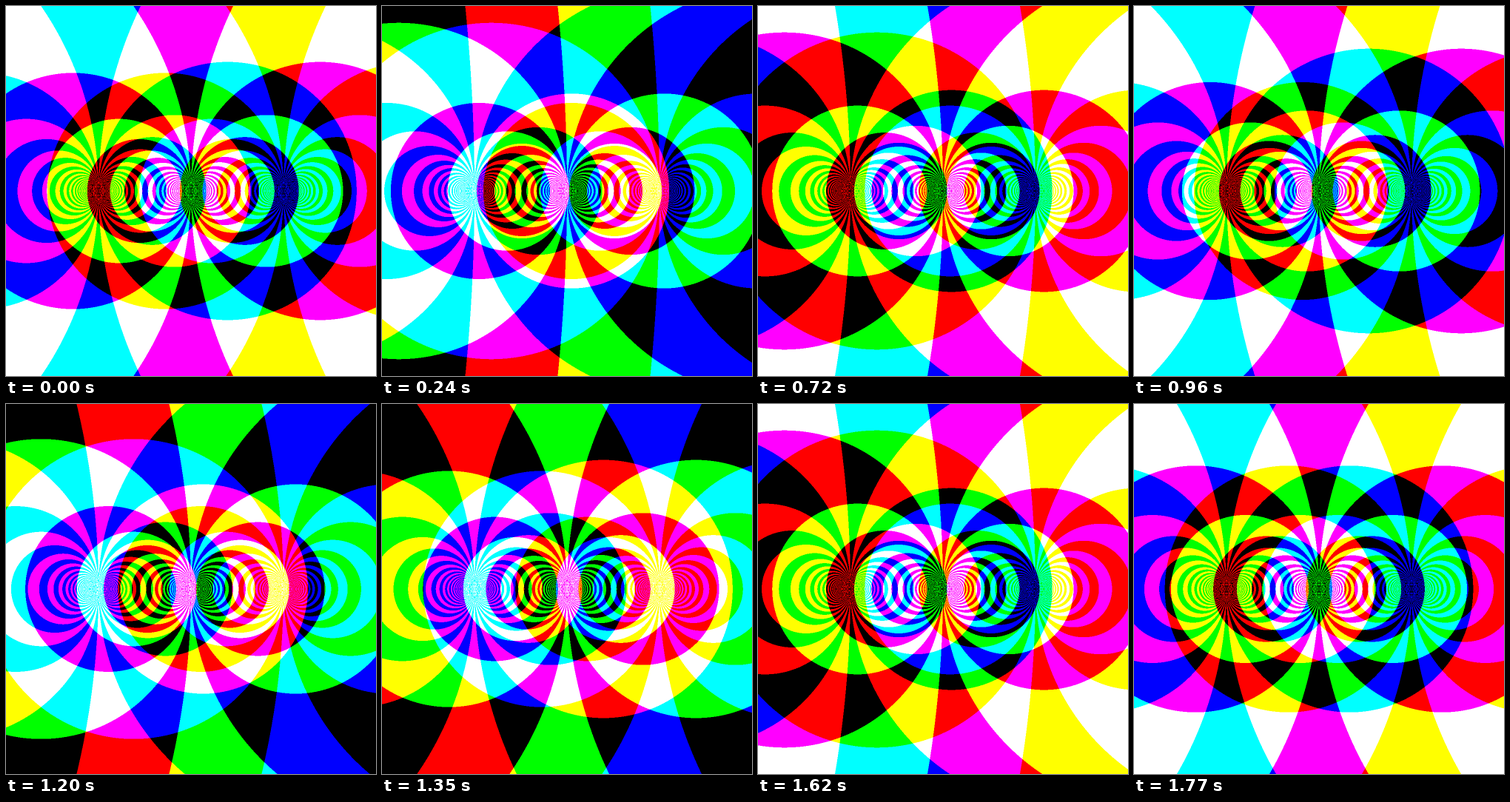
An HTML page with a canvas that plays this animation: 500x500 px, repeating every 1800 ms.

```html
<!DOCTYPE html>
<html lang="en">
<head>
<meta charset="utf-8">
<title>Inverted stripes</title>
<style>
  html, body { margin: 0; width: 100%; height: 100%; overflow: hidden; background: #fff; }
  canvas { display: block; width: 500px; height: 500px; image-rendering: pixelated; }
</style>
</head>
<body>
<canvas id="stage" width="500" height="500"></canvas>
<script>
const SIZE = 500, STEP = 30, STEPS = 60;
const SHIFT = SIZE / 4;              // distance between the red, green and blue centres
const WIDE = SIZE + 2 * SHIFT;       // one field serves all three channels
const SUB = 2, SAMPLES = SUB * SUB;  // samples per pixel, for soft edges
const ctx = document.getElementById('stage').getContext('2d');
const image = ctx.createImageData(SIZE, SIZE);
const data = image.data.fill(255);

// Real part of 1/z in stage units: vertical stripes turned into tangent circles.
function inverted(x, y) {
  const dx = x - WIDE / 2, dy = y - SIZE / 2;
  return SIZE * dx / (dx * dx + dy * dy);
}

const field = new Float64Array(WIDE * SIZE * SAMPLES);
for (let y = 0, i = 0; y < SIZE; y++) {
  for (let x = 0; x < WIDE; x++) {
    for (let s = 0; s < SAMPLES; s++) {
      const sx = (s % SUB + 0.5) / SUB;
      const sy = (Math.floor(s / SUB) + 0.5) / SUB;
      field[i++] = inverted(x + sx, y + sy);
    }
  }
}

const stripes = new Uint8ClampedArray(WIDE * SIZE);

function draw(step) {
  // Four stripes pass per loop; 0.5 centres a dark stripe on the axis.
  const phase = 4 * (step + 1) / STEPS + 0.5;
  for (let q = 0, i = 0; q < stripes.length; q++) {
    let lit = 0;
    for (let s = 0; s < SAMPLES; s++) lit += Math.floor(field[i++] + phase) & 1;
    stripes[q] = 255 * lit / SAMPLES;
  }
  for (let y = 0, p = 0; y < SIZE; y++) {
    let q = y * WIDE;
    for (let x = 0; x < SIZE; x++, p += 4, q++) {
      data[p] = stripes[q + 2 * SHIFT];
      data[p + 1] = stripes[q + SHIFT];
      data[p + 2] = stripes[q];
    }
  }
  ctx.putImageData(image, 0, 0);
}

let shown = -1;
function tick() {
  const step = Math.floor(performance.now() / STEP) % STEPS;
  if (step !== shown) draw(shown = step);
  requestAnimationFrame(tick);
}
tick();
</script>
</body>
</html>
```
